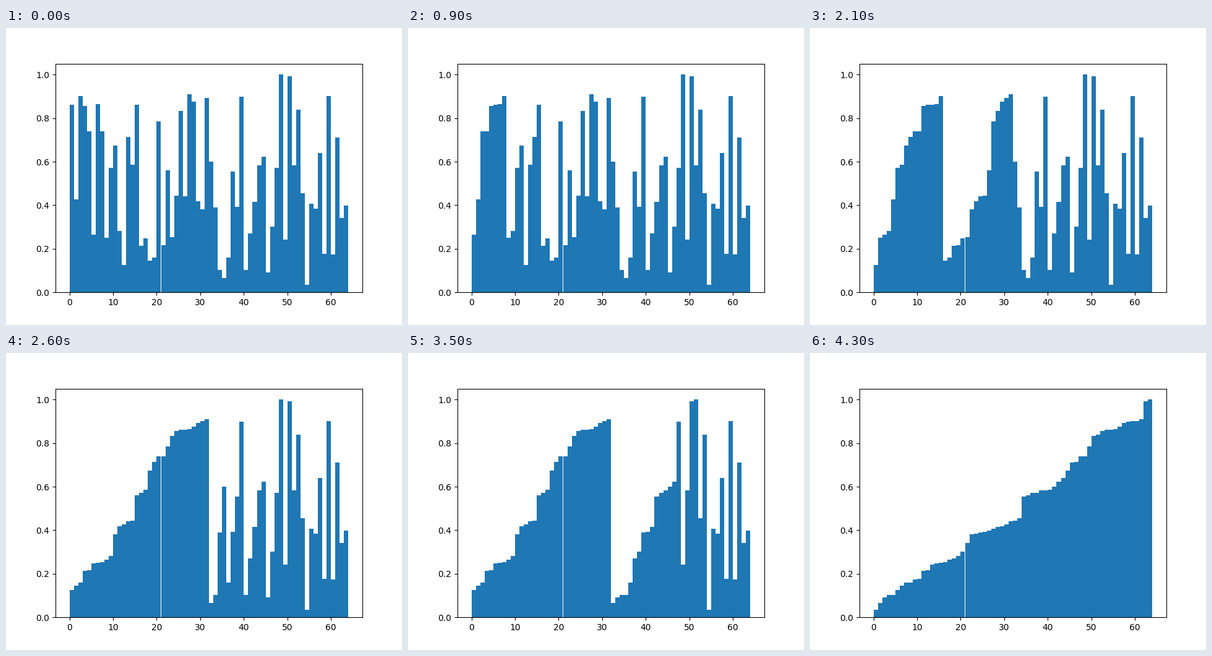
Recreate the animation shown at these times as a matplotlib script. Size 640 px wide and 480 px high, loop 4.4 s.

```python
import matplotlib.pyplot as plt
from matplotlib.animation import FuncAnimation

VALUES = [
    .861, .427, .901, .856, .739, .265, .864, .739,
    .250, .571, .674, .281, .125, .713, .585, .861,
    .213, .247, .145, .159, .785, .2165, .560, .253,
    .443, .833, .440, .910, .8755, .418, .381, .893,
    .600, .390, .102, .065, .159, .554, .392, .898,
    .103, .270, .415, .583, .622, .091, .301, .571,
    1.00, .242, .991, .583, .838, .455, .034, .406,
    .384, .640, .176, .901, .173, .710, .341, .398,
]


def merge_sort(data, lo, hi, states):
    """Sort data[lo:hi] in place, keeping a copy after each merge that changed it."""
    if hi - lo < 2:
        return
    mid = (lo + hi) // 2
    merge_sort(data, lo, mid, states)
    merge_sort(data, mid, hi, states)
    merged = sorted(data[lo:hi])
    if merged != data[lo:hi]:
        data[lo:hi] = merged
        states.append(data.copy())


states = [VALUES]
merge_sort(VALUES.copy(), 0, len(VALUES), states)

fig, ax = plt.subplots(figsize=(6.4, 4.8), dpi=100)
bars = ax.bar(range(len(VALUES)), VALUES, width=1, align="edge", color="#1f77b4")


def draw(step):
    for bar, height in zip(bars, states[step]):
        bar.set_height(height)
    return bars.patches


anim = FuncAnimation(fig, draw, frames=len(states), interval=100,
                     init_func=lambda: draw(0), repeat=True, repeat_delay=0)
plt.show()
```
